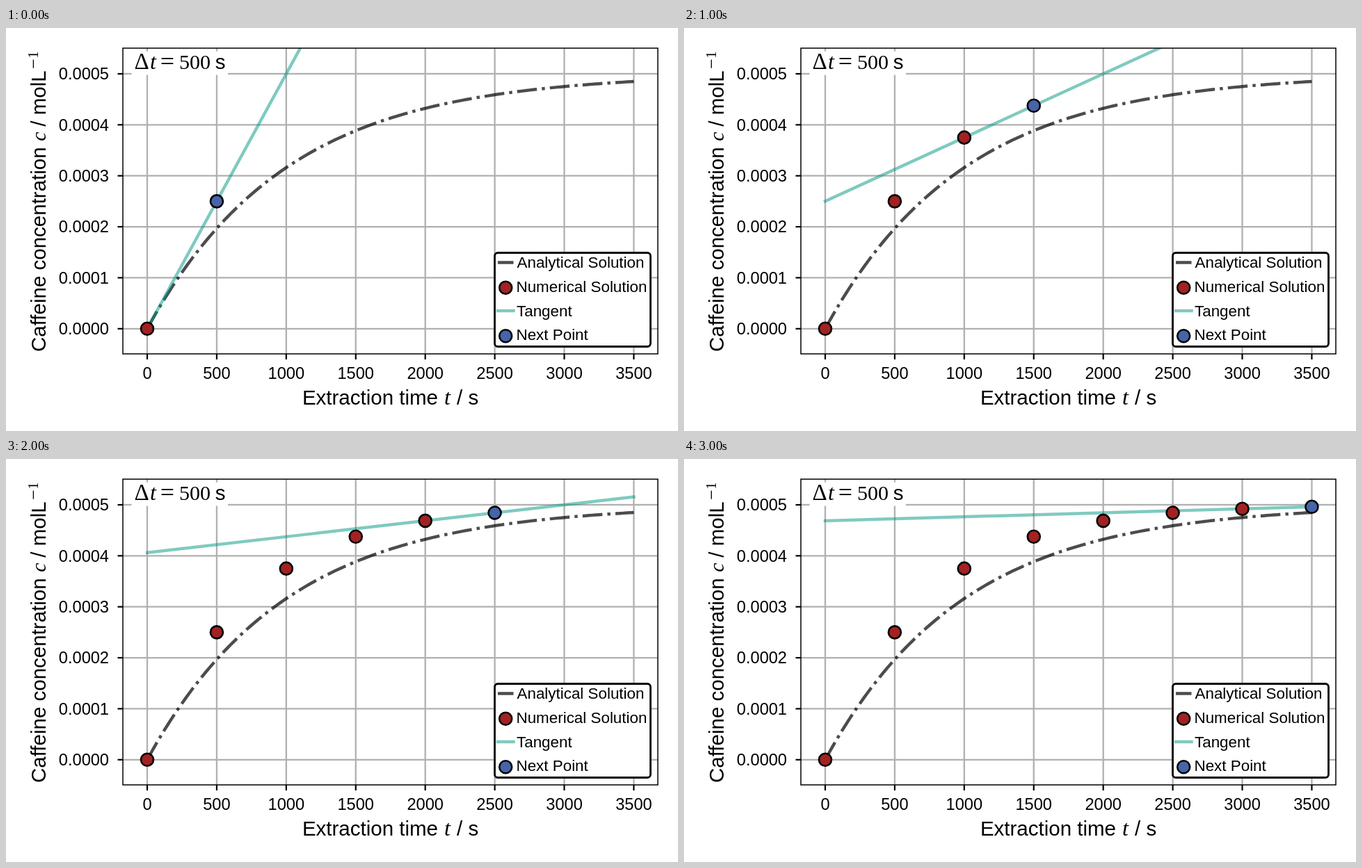
An HTML page that plays this animation: 966 by 580 pixels, repeating every 3500 ms.

```html
<!DOCTYPE html>
<html lang="en">
<head>
<meta charset="utf-8">
<title>Euler method</title>
<style>
  html, body { margin: 0; width: 100%; height: 100%; overflow: hidden; background: #fff; }
  svg { display: block; width: 966px; height: 580px; }
  text { font-family: "Liberation Sans", Arial, sans-serif; fill: #000; white-space: pre; }
  .tick text { font-size: 23.6px; }
  .label { font-size: 29.5px; }
  .legend text { font-size: 22.4px; }
  .math { font-family: "Liberation Serif", "Times New Roman", serif; }
  .it { font-style: italic; font-size: 32px; }
  .mid { text-anchor: middle; }
  .end { text-anchor: end; }
  .grid { stroke: #b0b0b0; stroke-width: 2.3; }
  .mark { stroke: #000; stroke-width: 2.4; }
  .tick line { stroke: #000; stroke-width: 2.2; }
  .curve, .tangent { fill: none; stroke-width: 4.46; }
  .curve { stroke: #000; stroke-opacity: .7; stroke-dasharray: 28.54 7.14 4.46 7.14; }
  .tangent { stroke: #009682; stroke-opacity: .5; stroke-linecap: square; }
  .dot { stroke: #000; stroke-width: 2.6; }
  .known { fill: #a22223; }
  .next { fill: #4664aa; }
  .step { opacity: 0; animation: show 3500ms step-end infinite; }
  @keyframes show {
    0% { opacity: 1; }
    14.2857%, 100% { opacity: 0; }
  }
</style>
</head>
<body>
<svg viewBox="0 0 966 580">
  <clipPath id="area"><rect x="168" y="29" width="769" height="440"/></clipPath>
  <g id="grid" class="grid"></g>
  <g clip-path="url(#area)">
    <path id="curve" class="curve"/>
    <g id="steps"></g>
  </g>
  <g id="ticks" class="tick"></g>

  <rect x="180.5" y="33.5" width="138.5" height="34" fill="#fff"/>
  <g class="label">
    <text class="math" x="184.5" y="59" font-size="33">Δ</text>
    <text class="math it" x="207" y="59">t</text>
    <text class="math mid" x="232" y="60" font-size="36">=</text>
    <text class="math" x="249" y="59" font-size="30">500</text>
    <text x="300.7" y="59">s</text>
  </g>
  <rect x="168" y="29" width="769" height="440" fill="none" stroke="#000" stroke-width="1.5"/>

  <g class="label">
    <text x="425.9" y="542">Extraction time</text>
    <text class="math it mid" x="634.5" y="542">t</text>
    <text x="648" y="542">/ s</text>
  </g>
  <g class="label" transform="translate(57 466) rotate(-90)">
    <text x="0" y="0">Caffeine concentration</text>
    <text class="math it mid" x="310" y="0" style="font-size:30px">c</text>
    <text x="324.3" y="0">/ molL</text>
    <text class="math mid" x="414.5" y="-9.5" font-size="26">−</text>
    <text class="math mid" x="427.5" y="-11" font-size="20.6">1</text>
  </g>

  <g class="legend">
    <rect x="702.5" y="323.5" width="224" height="135" rx="4.5" fill="#fff" stroke="#000" stroke-width="2.8"/>
    <path class="curve" d="M707 337.5H729.5"/>
    <circle class="dot known" cx="718.2" cy="373.8" r="9"/>
    <path class="tangent" d="M707 407H729.5"/>
    <circle class="dot next" cx="718.2" cy="443.3" r="9"/>
    <text x="734.5" y="345">Analytical Solution</text>
    <text x="733.5" y="379.7">Numerical Solution</text>
    <text x="734" y="414.5">Tangent</text>
    <text x="733.5" y="449.2">Next Point</text>
  </g>
</svg>
<script>
  const STEP = 500, END = 3500, COUNT = END / STEP;
  const LIMIT = 5, TAU = 1000; // concentration in 1e-4 mol/L, time in s
  const $ = id => document.getElementById(id);
  const px = t => +(203 + t * 0.19984).toFixed(2);
  const py = c => +(432.8 - c * 73.37).toFixed(2);
  const dot = (kind, [t, c]) =>
    `<circle class="dot ${kind}" cx="${px(t)}" cy="${py(c)}" r="9"/>`;

  // grid and tick labels
  let grid = '', ticks = '';
  for (let t = 0; t <= END; t += STEP) {
    const x = px(t);
    grid += `<line x1="${x}" x2="${x}" y1="29" y2="469"/>`;
    ticks += `<line x1="${x}" x2="${x}" y1="469" y2="477"/>` +
      `<text class="mid" x="${x}" y="505">${t}</text>`;
  }
  for (let c = 0; c <= LIMIT; c++) {
    const y = py(c);
    grid += `<line x1="168" x2="937" y1="${y}" y2="${y}"/>`;
    ticks += `<line x1="160.5" x2="168" y1="${y}" y2="${y}"/>` +
      `<text class="end" x="148" y="${y + 8.3}">0.000${c}</text>`;
  }
  $('grid').innerHTML = grid;
  $('ticks').innerHTML = ticks;

  // exact solution
  let path = '';
  for (let t = 0; t <= END; t += 25)
    path += `${t ? 'L' : 'M'}${px(t)} ${py(LIMIT * (1 - Math.exp(-t / TAU)))}`;
  $('curve').setAttribute('d', path);

  // one group per explicit Euler step
  const slope = c => (LIMIT - c) / TAU;
  const points = [[0, 0]];
  let steps = '';
  for (let n = 0; n < COUNT; n++) {
    const [t, c] = points[n], k = slope(c);
    const next = [t + STEP, c + k * STEP];
    steps += `<g class="step" style="animation-delay:${n * 500 - 3500}ms">` +
      `<path class="tangent" d="M${px(0)} ${py(c - k * t)}L${px(END)} ${py(c + k * (END - t))}"/>` +
      points.map(p => dot('known', p)).join('') + dot('next', next) + '</g>';
    points.push(next);
  }
  $('steps').innerHTML = steps;
</script>
</body>
</html>
```
